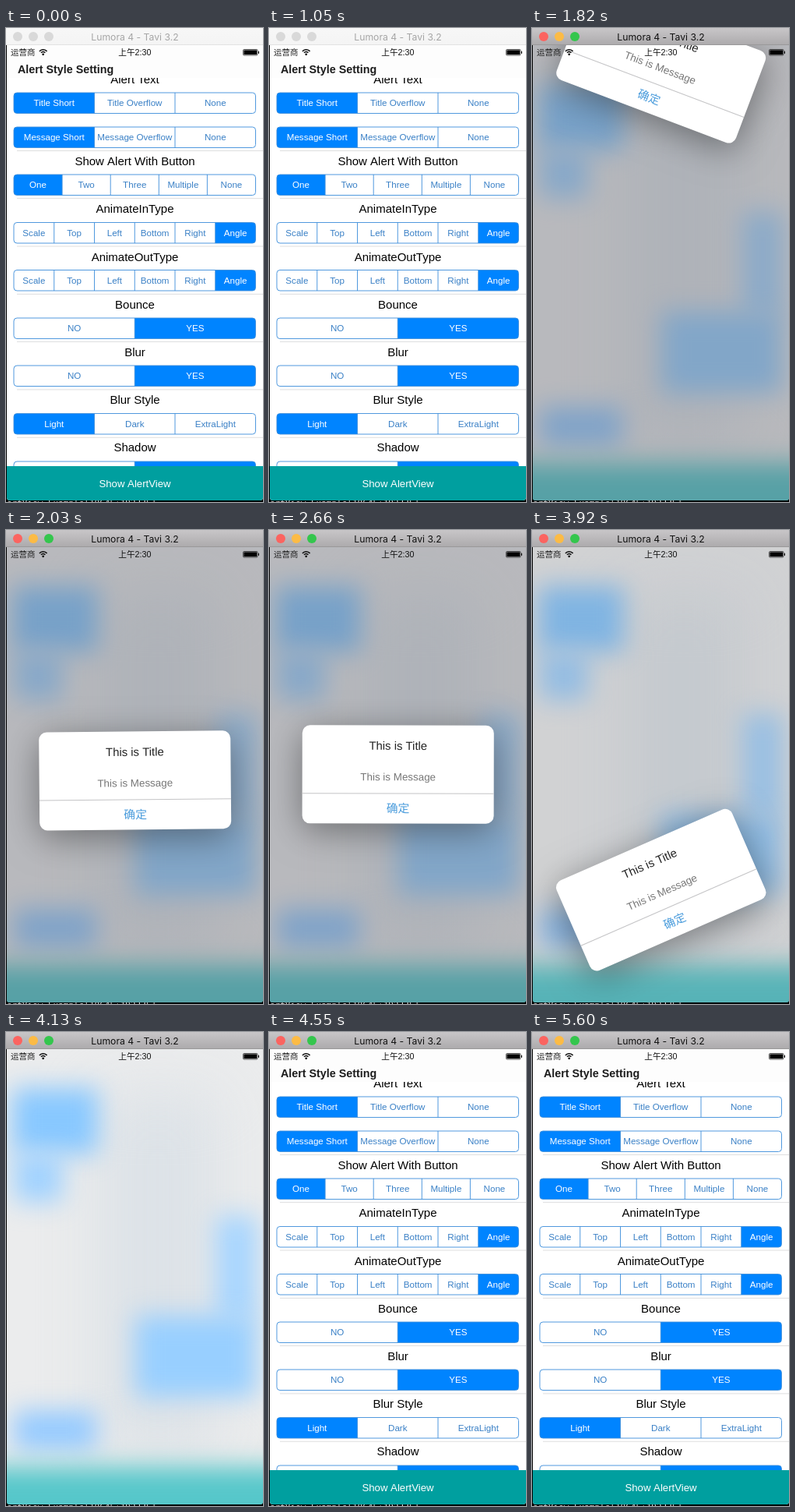
Recreate the animation shown at these times as an HTML page with a canvas. Size 330 by 608 pixels, loop 5.67 s.

```html
<!DOCTYPE html>
<html lang="zh">
<head>
<meta charset="utf-8">
<title>Alert Style Setting</title>
<style>
html, body { margin: 0; width: 100%; height: 100%; overflow: hidden; background: #000; }
canvas { display: block; width: 330px; height: 608px; }
</style>
</head>
<body>
<canvas id="stage"></canvas>
<script>
const W = 330, H = 608, LOOP = 5670, STEP = 70;
const TOP = 22, BOTTOM = 606;
const SANS = '"Liberation Sans", sans-serif';
const UI = 'Inter, Roboto, sans-serif';
const CJK = '"Noto Sans CJK SC", "Noto Sans CJK", sans-serif';
const BLUE = '#0084ff';

const canvas = document.getElementById('stage');
const dpr = window.devicePixelRatio || 1;
canvas.width = W * dpr;
canvas.height = H * dpr;
const ctx = canvas.getContext('2d');

const clamp = v => Math.max(0, Math.min(1, v));
const ramp = (t, a, b) => clamp((t - a) / (b - a));

function label(str, x, y, size, color, family = SANS, weight = 400, align = 'center') {
  ctx.font = `${weight} ${size}px ${family}`;
  ctx.fillStyle = color;
  ctx.textAlign = align;
  ctx.fillText(str, x, y + size * 0.36);
}

function box(c, x, y, w, h, color) {
  c.fillStyle = color;
  c.fillRect(x, y, w, h);
}

function disc(x, y, r, color) {
  ctx.beginPath();
  ctx.arc(x, y, r, 0, Math.PI * 2);
  ctx.fillStyle = color;
  ctx.fill();
}

// Each section: caption, caption y, segment y, items, selected index
const sections = [
  ['Alert Text', 66, 83, ['Title Short', 'Title Overflow', 'None'], 0],
  ['', 0, 127, ['Message Short', 'Message Overflow', 'None'], 0],
  ['Show Alert With Button', 171, 188, ['One', 'Two', 'Three', 'Multiple', 'None'], 0],
  ['AnimateInType', 232, 249.5, ['Scale', 'Top', 'Left', 'Bottom', 'Right', 'Angle'], 5],
  ['AnimateOutType', 293.5, 310.5, ['Scale', 'Top', 'Left', 'Bottom', 'Right', 'Angle'], 5],
  ['Bounce', 354.5, 372, ['NO', 'YES'], 1],
  ['Blur', 416, 433, ['NO', 'YES'], 1],
  ['Blur Style', 477, 494.5, ['Light', 'Dark', 'ExtraLight'], 0],
  ['Shadow', 538, 556, ['NO', 'YES'], 1]
];

function segments(y, items, selected) {
  const x = 10, w = 310.5, h = 26.5, cell = w / items.length;
  ctx.save();
  ctx.beginPath();
  ctx.roundRect(x, y, w, h, 4);
  ctx.clip();
  box(ctx, x + selected * cell, y, cell, h, BLUE);
  ctx.restore();
  ctx.beginPath();
  ctx.roundRect(x, y, w, h, 4);
  for (let i = 1; i < items.length; i++) {
    ctx.moveTo(x + i * cell, y);
    ctx.lineTo(x + i * cell, y + h);
  }
  ctx.strokeStyle = '#3d8edb';
  ctx.lineWidth = 0.9;
  ctx.stroke();
  items.forEach((item, i) =>
    label(item, x + (i + 0.5) * cell, y + h / 2, 11.6, i === selected ? '#fff' : '#3a80c6'));
}

function clipScreen() {
  ctx.beginPath();
  ctx.roundRect(1, TOP, W - 1, BOTTOM - TOP, [0, 0, 4, 4]);
  ctx.clip();
}

function drawList() {
  box(ctx, 0, TOP, W, BOTTOM - TOP, '#fff');
  for (let i = 0; i < 7; i++) box(ctx, 14, 157 + i * 61.3, W - 14, 0.8, '#d6d6d8');
  for (const [caption, cy, y, items, selected] of sections) {
    if (caption) label(caption, 165.5, cy, 15, '#000');
    segments(y, items, selected);
  }
  box(ctx, 0, TOP, W, 42, '#fdfdfd');
  label('Alert Style Setting', 15, 53, 14.3, '#1c1c1c', SANS, 700, 'left');
  box(ctx, 0, 562, W, BOTTOM - 562, '#009f9f');
  label('Show AlertView', 165.5, 584.5, 13.2, '#fff');
}

function makeFrost() {
  const layer = document.createElement('canvas');
  layer.width = W;
  layer.height = H;
  const c = layer.getContext('2d');
  box(c, 0, 0, W, H, '#ebeced');
  c.filter = 'blur(38px)';
  box(c, 120, 80, 150, 460, '#dce2e7');
  c.filter = 'blur(16px)';
  box(c, 8, 72, 110, 84, '#88c8ff');
  box(c, 10, 156, 62, 62, '#a0d2ff');
  box(c, 270, 236, 52, 134, '#a6d5ff');
  box(c, 166, 364, 155, 104, '#98cfff');
  box(c, 10, 486, 106, 50, '#94caff');
  box(c, -60, 558, W + 120, 160, '#56c7ca');
  c.filter = 'none';
  return layer;
}
const frost = makeFrost();

function drawFrost(alpha, dim) {
  ctx.globalAlpha = alpha;
  ctx.drawImage(frost, 0, 0, W, H);
  ctx.globalAlpha = 1;
  box(ctx, 0, 0, W, H, `rgba(91,91,97,${0.35 * dim})`);
}

function drawAlert(dy, degrees) {
  const w = 246, h = 126;
  ctx.save();
  ctx.translate(165.7, 314.7 + dy);
  ctx.rotate(degrees * Math.PI / 180);
  ctx.save();
  ctx.shadowColor = 'rgba(0,0,0,0.4)';
  ctx.shadowBlur = 46 * dpr;
  ctx.shadowOffsetY = 9 * dpr;
  ctx.beginPath();
  ctx.roundRect(-w / 2, -h / 2, w, h, 10);
  ctx.fillStyle = '#fff';
  ctx.fill();
  ctx.restore();
  box(ctx, -w / 2, 24, w, 1, '#c4c4c6');
  label('This is Title', 0, -37, 14.9, '#222');
  label('This is Message', 0, 3, 13.4, '#777');
  label('确定', 0, 43.5, 14.8, '#4a9cdc', CJK);
  ctx.restore();
}

function drawStatus() {
  label('运营商', 6, 31, 10.5, '#222', CJK, 400, 'left');
  ctx.strokeStyle = '#111';
  ctx.lineWidth = 1.5;
  for (const r of [3.6, 6.4]) {
    ctx.beginPath();
    ctx.arc(47.7, 34.2, r, -Math.PI * 0.77, -Math.PI * 0.23);
    ctx.stroke();
  }
  disc(47.7, 33.8, 1.4, '#111');
  label('上午2:30', 165.3, 31, 10.7, '#111', `"Liberation Sans", ${CJK}`);
  ctx.beginPath();
  ctx.roundRect(304.5, 27.5, 18.5, 7.5, 1.2);
  ctx.lineWidth = 0.7;
  ctx.stroke();
  box(ctx, 305.4, 28.4, 16.7, 5.7, '#000');
  box(ctx, 323.8, 29.8, 1.2, 3, '#111');
}

function drawTitleBar(active) {
  const g = ctx.createLinearGradient(0, 0, 0, TOP);
  g.addColorStop(0, active ? '#c8c6c8' : '#f7f7f7');
  g.addColorStop(1, active ? '#acaaac' : '#f4f4f4');
  box(ctx, 0, 0, W, TOP, g);
  box(ctx, 0, TOP - 0.8, W, 0.8, active ? '#979597' : '#dedede');
  const lights = active ? ['#fb6460', '#fcbb45', '#34c64d'] : Array(3).fill('#d9d9d9');
  lights.forEach((color, i) => disc(15 + i * 20, 11, 6, color));
  label('Lumora 4 - Tavi 3.2', 165.5, 11.3, 12.2, active ? '#111' : '#a6a6a6', UI);
}

function drawDesktop() {
  box(ctx, 0, 0, W, H, '#000');
  label('ertView Example[10645:192335]', 1, 609, 11, '#e0e0e0', '"DejaVu Sans Mono", monospace', 400, 'left');
  box(ctx, 0, TOP, W, BOTTOM - 1 - TOP, '#000');
}

// Remaining distance of an underdamped spring, from 1 towards 0
function spring(sec) {
  const z = 0.7, w = 9, wd = w * Math.sqrt(1 - z * z);
  return Math.exp(-z * w * sec) * (Math.cos(wd * sec) + z * w / wd * Math.sin(wd * sec));
}

const IN = 1651, OUT = 3710, GONE = 4120;

function render(t) {
  const shown = ramp(t, 1510, 1770);
  ctx.setTransform(dpr, 0, 0, dpr, 0, 0);
  drawDesktop();
  ctx.save();
  clipScreen();
  drawList();
  drawFrost(shown * (1 - ramp(t, 4150, 4360)), shown * (1 - ramp(t, 3750, 4110)));
  if (t >= IN && t < OUT) {
    const left = t < 2870 ? spring((t - IN) / 1000) : 0;
    drawAlert(-580 * left, 45 * left);
  } else if (t >= OUT && t < GONE) {
    const p = ramp(t, OUT, GONE) ** 2;
    drawAlert(560 * p, -90 * p);
  }
  ctx.restore();
  drawStatus();
  drawTitleBar(t >= 1330);
}

const start = performance.now();
function tick() {
  const t = (performance.now() - start) % LOOP;
  render(Math.floor(t / STEP) * STEP);
  requestAnimationFrame(tick);
}
tick();
</script>
</body>
</html>
```
